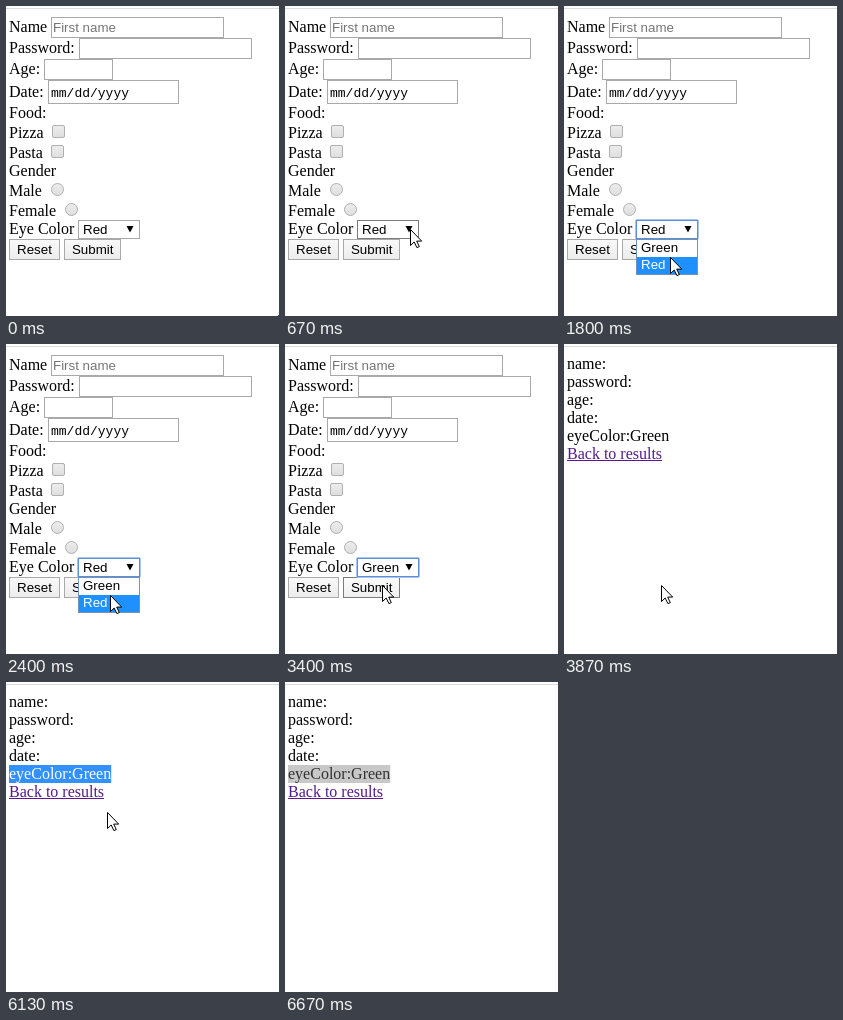
An HTML page for the animation above (6740 ms loop, 273 by 310 pixels).

```html
<!DOCTYPE html>
<html lang="en">
<head>
<meta charset="utf-8">
<title>Form demo</title>
<style>
  html, body { margin: 0; width: 100%; height: 100%; overflow: hidden; background: #fff; }
  svg { display: block; width: 100%; height: 100%; }
  text { font: 16px "Liberation Serif", "Times New Roman", serif; white-space: pre; }
  .ui { font: 13.333px "Liberation Sans", Arial, sans-serif; }
  .mono { font: 13px "Liberation Mono", monospace; }
  .hint { fill: #757575; }
  .box { fill: #fff; stroke: #a9a9a9; }
  .mid { text-anchor: middle; }
  .link { fill: #551a8b; }
</style>
</head>
<body>
<svg viewBox="0 0 273 310">
  <defs>
    <linearGradient id="face" x2="0" y2="1">
      <stop stop-color="#f9f9f9"/><stop offset="1" stop-color="#ececec"/>
    </linearGradient>
    <linearGradient id="hover" x2="0" y2="1">
      <stop stop-color="#fbfbfb"/><stop offset="1" stop-color="#efefef"/>
    </linearGradient>
    <linearGradient id="pressed" x2="0" y2="1">
      <stop stop-color="#e8e8e8"/><stop offset="1" stop-color="#dcdcdc"/>
    </linearGradient>
    <linearGradient id="tick" x2="0" y2="1">
      <stop stop-color="#ededed"/><stop offset="1" stop-color="#dedede"/>
    </linearGradient>
  </defs>
  <rect width="273" height="310" fill="#fff"/>
  <rect y="2" width="273" height="1" fill="#dcdcdc"/>

  <g id="form">
    <g id="labels"></g>
    <g id="fields"></g>
    <text class="ui hint" x="47" y="26">First name</text>
    <text class="mono" x="45" y="91">mm/dd/yyyy</text>
    <g fill="url(#tick)" stroke="#b0b0b0">
      <rect x="46.5" y="119.500" width="12" height="12" rx="1.5"/>
      <rect x="45.5" y="139.500" width="12" height="12" rx="1.5"/>
      <circle cx="51.5" cy="183.500" r="6"/>
      <circle cx="65.5" cy="203.500" r="6"/>
    </g>
    <rect x="3.5" y="233.5" width="50" height="20" fill="url(#face)" stroke="#a9a9a9"/>
    <text class="ui mid" x="28.5" y="248">Reset</text>
    <rect id="submit" x="58.5" y="233.5" width="56" height="20"/>
    <text class="ui mid" x="86.7" y="248">Submit</text>
    <rect id="select" class="box" x="72.5" y="214.5" width="61" height="18"/>
    <rect id="ring" x="71.5" y="213.5" width="63" height="20" rx="1" fill="none" stroke="#a5c4f2"/>
    <text id="value" class="ui" x="77" y="228"></text>
    <path d="M120.500 220h7l-3.500 6.500z"/>
    <g id="list">
      <rect x="72.5" y="233.5" width="61" height="35" fill="#fff" stroke="#7391b8"/>
      <rect id="mark" x="73" width="60" height="17" fill="#1e90ff"/>
      <text id="green" class="ui" x="77" y="246">Green</text>
      <text id="red" class="ui" x="77" y="263">Red</text>
    </g>
  </g>

  <g id="results">
    <rect id="selection" x="3" y="83" width="102.2" height="18"/>
    <g id="lines"></g>
    <text class="link" x="3" y="115">Back to results</text>
    <rect class="link" x="3" y="116" width="95" height="1"/>
  </g>

  <g id="cursor">
    <path id="arrow" d="M.5 .5v16l3.7-3.5 2.7 5.6 2.4-1-2.6-5.5h5z" fill="#fff" stroke="#000"/>
    <path id="beam" d="M-3 -7.5h2.5l.5 .5 .5-.5h2.5M0 -7v15M-3 8.5h2.5l.5-.5 .5 .5h2.5" fill="none" stroke="#000"/>
    <path id="hand" d="M-.5 10V1.5q1-2 2.5 0V7q2.5-1 3 .5 2.5-1 3 .7 2.5-.4 2.5 1.3v4.5l-2 4.500H.5l-4.500-7q-1-2.500 1-2.500z" fill="#fff" stroke="#000"/>
  </g>
</svg>
<script>
const LOOP = 6740;
const $ = id => document.getElementById(id);
const show = (id, on) => $(id).setAttribute('display', on ? 'inline' : 'none');
const paint = (id, fill, stroke) => {
  $(id).setAttribute('fill', fill);
  if (stroke) $(id).setAttribute('stroke', stroke);
};

$('labels').innerHTML = [
  ['Name', 26], ['Password:', 47], ['Age:', 68], ['Date:', 91], ['Food:', 112], ['Pizza', 132],
  ['Pasta', 152], ['Gender', 170], ['Male', 190], ['Female', 210], ['Eye Color', 228]
].map(([s, y]) => `<text x="3" y="${y}">${s}</text>`).join('');

$('fields').innerHTML = [
  [45, 11, 173, 21], [73, 32, 173, 21], [38, 53, 69, 21], [42, 74, 131, 24]
].map(([x, y, w, h]) =>
  `<rect class="box" x="${x + .5}" y="${y + .5}" width="${w - 1}" height="${h - 1}"/>`).join('');

$('lines').innerHTML = ['name:', 'password:', 'age:', 'date:', 'eyeColor:Green']
  .map((s, i) => `<text x="3" y="${25 + 18 * i}">${s}</text>`).join('');
const picked = $('lines').lastChild;

// Pointer path: [tick, x, y], 15 ticks per second
const path = [
  [0, 272, 309], [3, 212, 292], [6, 112, 249], [8, 114, 236], [10, 125, 223],
  [12, 125, 223], [18, 108, 248], [23, 108, 248], [26, 106, 253], [29, 105, 246],
  [33, 105, 246], [36, 104, 251], [43, 104, 251], [46, 103, 243], [51, 97, 241],
  [63, 97, 241], [67, 95, 190], [70, 90, 125], [71, 84, 112], [73, 86, 94],
  [91, 86, 94], [92, 101, 130], [93, 128, 205], [94, 163, 281], [101, 163, 281]
];

function pointer(tick) {
  const i = path.findIndex(k => k[0] > tick);
  const [a, ax, ay] = path[i - 1], [b, bx, by] = path[i];
  const p = (tick - a) / (b - a);
  return [Math.round(ax + (bx - ax) * p), Math.round(ay + (by - ay) * p)];
}

function drawForm(tick, x, y) {
  const open = tick >= 12 && tick < 47;
  const focused = tick >= 12 && tick < 55;
  const overSelect = x >= 72 && x < 134 && y >= 214 && y < 233;
  const overSubmit = !open && x >= 58 && x < 115 && y >= 233 && y < 254;
  const onRed = y < 234 || y >= 251;

  show('ring', focused);
  $('select').style.stroke = focused ? '#5b8fd6' : overSelect ? '#7b7b7b' : '#a9a9a9';
  $('value').textContent = tick < 47 ? 'Red' : 'Green';
  show('list', open);
  $('mark').setAttribute('y', onRed ? 251 : 234);
  paint('red', onRed ? '#fff' : '#000');
  paint('green', onRed ? '#000' : '#fff');

  if (tick === 55) paint('submit', 'url(#pressed)', '#5b8fd6');
  else if (tick > 55) paint('submit', 'url(#hover)', '#5b8fd6');
  else if (overSubmit) paint('submit', 'url(#hover)', '#7b7b7b');
  else paint('submit', 'url(#face)', '#a9a9a9');
}

function drawResults(tick) {
  const active = tick < 100;
  show('selection', tick >= 77);
  paint('selection', active ? '#3390ff' : '#c8c8c8');
  picked.setAttribute('fill', tick < 77 ? '#000' : active ? '#fff' : '#323232');
}

function draw(ms) {
  const tick = Math.min(100, Math.floor((ms + 4) * 0.015));
  const [x, y] = pointer(tick);
  const done = tick >= 58;
  show('form', !done);
  show('results', done);
  if (done) drawResults(tick);
  else drawForm(tick, x, y);

  const shape = !done || y >= 119 ? 'arrow' : y >= 101 ? 'hand' : 'beam';
  for (const id of ['arrow', 'hand', 'beam']) show(id, id === shape);
  show('cursor', tick < 95);
  const half = shape === 'beam' ? 0.5 : 0;
  $('cursor').setAttribute('transform', `translate(${x + half} ${y})`);
}

const start = performance.now();
function frame() {
  draw((performance.now() - start) % LOOP);
  requestAnimationFrame(frame);
}
frame();
</script>
</body>
</html>
```
